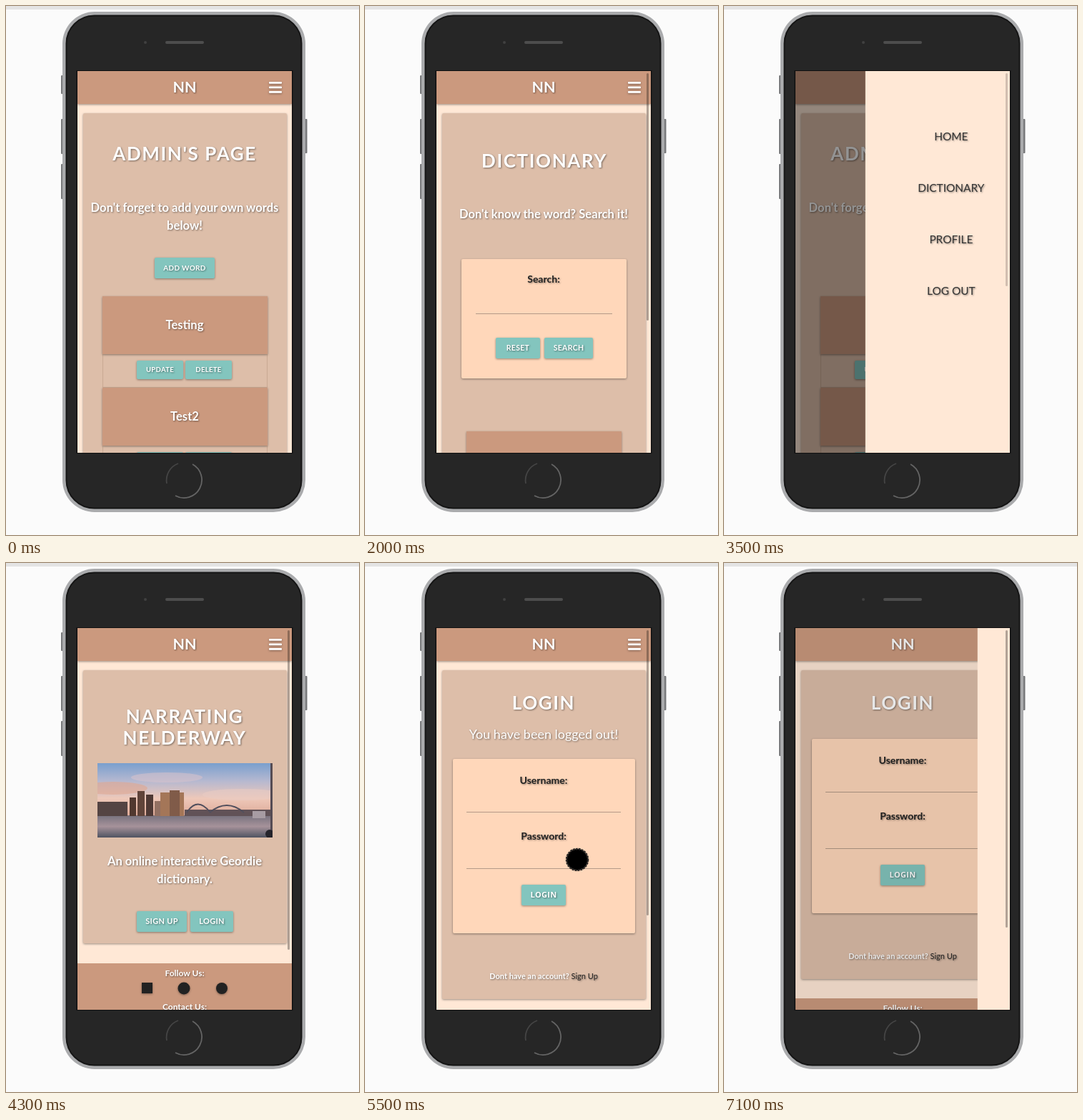
These frames come from a looping animation (494 by 740 pixels, 7.2 s). An HTML page:

```html
<!DOCTYPE html>
<html lang="en">
<head>
<meta charset="utf-8">
<title>Dictionary app on a phone</title>
<style>
  html, body { margin: 0; width: 100%; height: 100%; overflow: hidden; background: #fbfbfb; }
  svg { display: block; }
  text { font-family: Lato, sans-serif; font-weight: 700; text-anchor: middle; fill: #fff; filter: drop-shadow(1.5px 1.5px 1px rgba(0,0,0,.45)); }
  .heading { font-size: 26px; letter-spacing: 1.6px; }
  .body { font-size: 16.6px; }
  .dark { fill: #222; }
  .menu { font-size: 15.4px; font-weight: 400; fill: #333; }
  .raised { filter: drop-shadow(0 1px 1.5px rgba(0,0,0,.4)); }
</style>
</head>
<body>
<svg id="stage" width="494" height="740" viewBox="0 0 494 740"></svg>
<script>
const CLAY = '#cb997e', SAND = '#ddbea9', CREAM = '#ffe8d6', PEACH = '#ffd7ba', TEAL = '#83c5be';
const LOOP = 7200, STEP = 100;

const rect = (x, y, w, h, fill, extra = '') =>
  `<rect x="${x}" y="${y}" width="${w}" height="${h}" fill="${fill}" ${extra}/>`;
const panel = (x, y, w, h, fill) => rect(x, y, w, h, fill, 'rx="2" class="raised"');
const text = (s, x, y, cls, style = '') => `<text x="${x}" y="${y}" class="${cls}" style="${style}">${s}</text>`;
const button = (s, x, y, w, h, size, family = 'Lato') =>
  panel(x, y, w, h, TEAL) +
  text(s, x + w / 2, y + h / 2 + size * .36, '', `font:700 ${size}px ${family},sans-serif;letter-spacing:.3px`);
const rule = y => rect(142, y, 216, 1, '#b39a88');

const header = rect(100, 91, 300, 46, CLAY, 'class="raised"') +
  text('NN', 250, 121, '', 'font-size:21.5px') +
  `<g class="raised">${[106, 112.5, 119].map(y => rect(368, y, 18, 2.8, '#fff', 'rx="1"')).join('')}</g>`;

const page = (cardHeight, content) => rect(100, 91, 300, 534, CREAM) + panel(108, 150, 285, cardHeight, SAND) + content + header;

const footer = y => rect(100, y, 300, 120, CLAY) +
  text('Follow Us:', 250, y + 18, '', 'font-size:12px') +
  `<g fill="#222" class="raised"><rect x="190" y="${y + 27}" width="15" height="15"/>
   <circle cx="249" cy="${y + 35}" r="8.5"/><circle cx="302" cy="${y + 35}" r="8"/></g>` +
  text('Contact Us:', 250, y + 65, '', 'font-size:12px');

const wordRow = (word, y) => rect(135.5, y + .5, 230, 127, 'none', 'stroke="#c9a993"') +
  rect(135, y, 231, 81, CLAY, 'class="raised"') + text(word, 250, y + 46, 'body') +
  button('UPDATE', 183, y + 90, 65, 26, 9.6) + button('DELETE', 251, y + 90, 65, 26, 9.6);

const adminPage = page(520,
  text("ADMIN'S PAGE", 250, 216, 'heading') +
  text("Don't forget to add your own words", 250, 288, 'body') + text('below!', 250, 313, 'body') +
  button('ADD WORD', 208, 352, 84, 29, 10) + wordRow('Testing', 406) + wordRow('Test2', 534));

const dictionaryPage = page(520,
  text('DICTIONARY', 251, 226, 'heading') +
  text("Don't know the word? Search it!", 250, 297, 'body') +
  panel(135, 354, 231, 167, PEACH) + text('Search:', 250, 387, 'dark', 'font-size:14px') +
  rect(155, 430, 191, 1, '#b39a88') +
  button('RESET', 183, 464, 62, 29, 10.5) + button('SEARCH', 251, 464, 68, 29, 10.5) +
  rect(142, 595, 217, 81, CLAY, 'class="raised"'));

const tower = (x, y, w, fill) => rect(x, y, w, 354 - y, fill);
const riverside = `<g clip-path="url(#photo)">
  ${rect(128, 280, 245, 74, 'url(#sky)')}
  <ellipse cx="150" cy="315" rx="48" ry="9" fill="#e2a790" opacity=".6"/>
  <ellipse cx="225" cy="300" rx="50" ry="7" fill="#d9c3cc" opacity=".55"/>
  <ellipse cx="330" cy="324" rx="55" ry="8" fill="#eacbc3" opacity=".6"/>
  ${rect(128, 353, 245, 31, 'url(#water)')}
  ${tower(128, 334, 42, '#544443')}${tower(173, 328, 9, '#51382f')}${tower(184, 319, 10, '#60443a')}
  ${tower(196, 324, 10, '#4e3935')}${tower(208, 333, 10, '#927062')}${tower(216, 321, 33, '#a47658')}
  ${tower(229, 318, 14, '#805b49')}${tower(250, 345, 123, '#615257')}
  <path d="M253 349Q268 326 286 349M285 349Q309 329 333 349" fill="none" stroke="#504e5c" stroke-width="1.8"/>
  ${rect(345, 347, 18, 10, '#a79ca3')}${rect(370, 280, 3, 104, '#554c54')}
  <circle cx="369" cy="379" r="6" fill="#25242b"/></g>`;

const homePage = page(382,
  text('NARRATING', 250, 224, 'heading') + text('NELDERWAY', 250, 254, 'heading') + riverside +
  text('An online interactive Geordie', 250, 423, 'body') + text('dictionary.', 250, 448, 'body') +
  button('SIGN UP', 183, 487, 70, 29, 11) + button('LOGIN', 258, 487, 60, 29, 11) + footer(560));

const loginPage = notice => {
  const dy = notice ? 28 : 0;
  return page(432 + dy,
    text('LOGIN', 250, 205, 'heading') +
    (notice ? text(notice, 250, 246, '', 'font-size:18px;font-weight:400') : '') +
    `<g transform="translate(0 ${dy})">` + panel(123, 246, 255, 244, PEACH) +
    text('Username:', 250, 281, 'dark', 'font-size:14px') + rule(320) +
    text('Password:', 250, 359, 'dark', 'font-size:14px') + rule(399) +
    button('LOGIN', 219, 422, 62, 29, 11, 'Open Sans') +
    text('Dont have an account? <tspan fill="#222" font-weight="400">Sign Up</tspan>', 250, 554, '', 'font-size:11px') +
    footer(609) + '</g>');
};

const member = ['HOME', 'DICTIONARY', 'PROFILE', 'LOG OUT'];
const guest = ['HOME', 'DICTIONARY', 'LOGIN', 'SIGN UP'];

// Each scene lasts until the next one loads; its drawer starts to open at `open`.
const scenes = [
  { start: 0, open: 850, bar: 0, items: member, art: adminPage },
  { start: 1700, open: 2264, bar: 440, items: member, art: dictionaryPage },
  { start: 2900, open: 3347, bar: 392, items: member, art: adminPage },
  { start: 3900, open: 4650, bar: 541, items: member, art: homePage },
  { start: 5500, open: 5950, bar: 493, items: guest, art: loginPage('You have been logged out!') },
  { start: 6600, open: 7075, bar: 510, items: guest, art: loginPage('') }
];

// Pointer strokes as [time, x, y]; it is hidden between strokes.
const strokes = [
  [[600, 392, 120], [700, 379, 115], [900, 379, 115], [1100, 389, 137], [1500, 285, 255], [1600, 284, 256]],
  [[2100, 388, 122], [2300, 379, 115]],
  [[2600, 320, 300], [2800, 286, 328]],
  [[3200, 392, 122], [3400, 382, 115]],
  [[3700, 310, 200], [3800, 286, 185]],
  [[4500, 394, 122], [4700, 380, 115], [5100, 300, 395], [5200, 297, 415], [5500, 297, 415]],
  [[5800, 390, 125], [6000, 380, 115], [6300, 288, 327], [6500, 286, 328]],
  [[6900, 392, 122], [7000, 382, 115]]
];

const gradient = (id, ...colors) => `<linearGradient id="${id}" x2="0" y2="1">` +
  colors.map((c, i) => `<stop offset="${i / (colors.length - 1)}" stop-color="${c}"/>`).join('') + '</linearGradient>';

const stage = document.getElementById('stage');
stage.innerHTML = `<defs>
  ${gradient('sky', '#799fce', '#b5b8d0', '#eec8b9', '#dda997')}
  ${gradient('water', '#77727e', '#a6929a', '#4f5361')}
  <clipPath id="screen">${rect(100, 91, 300, 534, '#000')}</clipPath>
  <clipPath id="photo">${rect(128, 280, 245, 104, '#000')}</clipPath></defs>
  ${rect(0, 0, 494, 740, '#fbfbfb')}${rect(0, 0, 494, 5, '#e4e4e4')}
  ${[[97, 26], [158, 49], [221, 49]].map(([y, h]) => rect(77, y, 4, h, '#77787a', 'rx="1"')).join('')}
  ${rect(417, 158, 4.5, 48, '#77787a', 'rx="1"')}
  ${rect(79, 8, 340, 700, '#aaabad', 'rx="45"')}
  ${rect(84.5, 13.5, 329, 689, '#262626', 'rx="39" stroke="#151515" stroke-width="2"')}
  <circle cx="195" cy="51" r="2" fill="#404040"/>${rect(223, 49, 54, 4, '#4d4d4d', 'rx="2"')}
  <g fill="none" stroke-width="1.8"><path d="M225 668A25 25 0 0 1 241 640" stroke="#454545"/>
  <path d="M261 641A25 25 0 0 1 237 685" stroke="#646464"/></g>
  ${rect(98.5, 90, 303, 536, '#111')}
  <g clip-path="url(#screen)">
    ${scenes.map(s => `<g class="scene">${s.art}</g>`).join('')}
    ${rect(100, 91, 300, 534, '#000', 'id="shade"')}
    <g id="drawer">${rect(162, 91, 240, 534, CREAM)}
      ${[0, 1, 2, 3].map(i => text('', 282, 188 + 72 * i, 'menu')).join('')}</g>
    ${rect(394, 94, 3, 0, '#000', 'id="bar" rx="1.5"')}
  </g>
  <g id="pointer"><circle r="15" fill="#000" stroke="#2b2927" stroke-width="2.5" stroke-dasharray="3 1"/></g>`;

const [shade, drawer, bar, pointer] = ['shade', 'drawer', 'bar', 'pointer'].map(id => document.getElementById(id));
const groups = [...stage.querySelectorAll('.scene')];
const labels = [...drawer.querySelectorAll('text')];
const clamp = v => Math.max(0, Math.min(1, v));
const easeOut = x => 1 - (1 - x) ** 2;

function pointerAt(t) {
  const stroke = strokes.find(s => t >= s[0][0] && t <= s[s.length - 1][0]);
  if (!stroke) return null;
  const i = Math.max(1, stroke.findIndex(k => k[0] >= t));
  const [a, b] = [stroke[i - 1], stroke[i]];
  const k = (t - a[0]) / (b[0] - a[0]);
  return [a[1] + (b[1] - a[1]) * k, a[2] + (b[2] - a[2]) * k];
}

function draw(t) {
  const current = scenes.filter(s => s.start <= t).pop();
  groups.forEach((g, i) => g.style.display = scenes[i] === current ? '' : 'none');

  const open = easeOut(clamp((t - current.open) / 250));
  shade.setAttribute('opacity', open * .5);
  drawer.style.display = open ? '' : 'none';
  drawer.setAttribute('transform', `translate(${238 * (1 - open)} 0)`);
  labels.forEach((label, i) => label.textContent = current.items[i]);

  bar.setAttribute('height', Math.max(0, current.bar - 94));
  bar.setAttribute('opacity', .3 * clamp((750 - (t - current.start)) / 250));

  const at = pointerAt(t);
  pointer.style.display = at ? '' : 'none';
  if (at) pointer.setAttribute('transform', `translate(${at})`);
}

const begin = performance.now();
function tick() {
  const t = (performance.now() - begin) % LOOP;
  draw(Math.floor(t / STEP) * STEP);
  requestAnimationFrame(tick);
}
tick();
</script>
</body>
</html>
```
